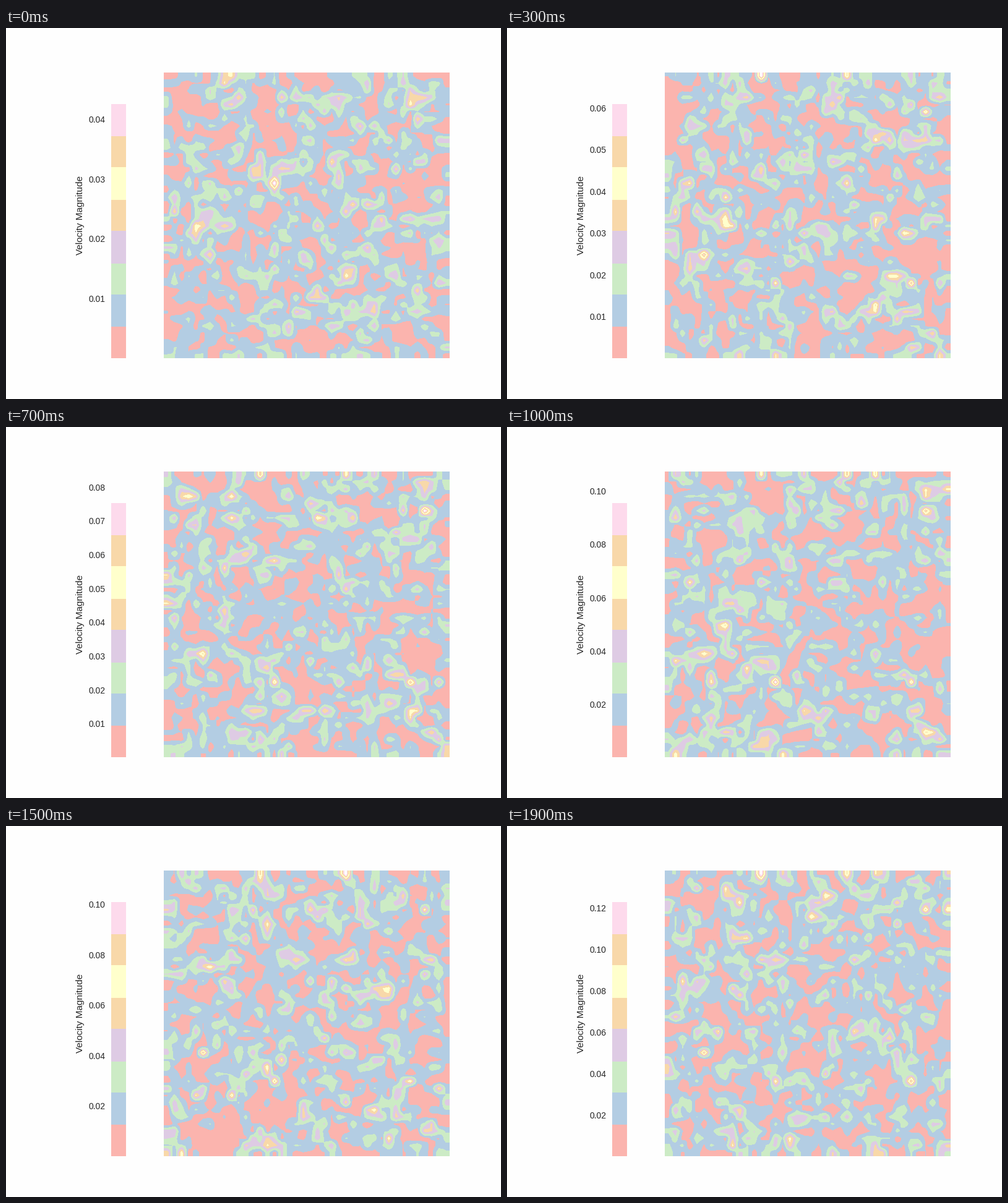
Recreate the animation shown at these times as a matplotlib script. Size 800 px wide and 600 px high, loop 2 s.

```python
import numpy as np
import matplotlib.pyplot as plt
from matplotlib.animation import FuncAnimation
from matplotlib.colors import ListedColormap

W, H, DPI = 800, 600, 100
N, FRAMES, STEP = 40, 20, 100
INK, PAPER, SAND = "#262626", "#fefefe", "#f8d8a9"
BANDS = ["#fbb4ae", "#b3cde3", "#ccebc5", "#decbe4", SAND,
         "#ffffcc", SAND, "#fddaec", PAPER]

# Top of the scale at a few moments
KEYS = [0, 3, 7, 10, 12, 15, 19]
PEAK = [.0478, .0685, .0846, .1074, .1021, .1134, .1379]

# Column and row of the eddies that outlast the rest
EDDIES = [(13, 0), (25, 0), (36, 5), (5, 25), (15, 29), (34, 29)]

plt.rcParams.update({"font.family": "Liberation Sans", "font.size": 10,
                     "axes.labelcolor": INK, "ytick.color": INK})


def blur(z):
    """Mix each cell with its four neighbours, keeping the variance."""
    near = sum(np.roll(z, s, axis) for s in (-1, 1) for axis in (0, 1))
    return (z + .5 * near) / np.sqrt(2)


def drift(seed, keep=.82):
    """Yield complex noise that forgets its past little by little."""
    rng = np.random.default_rng(seed)
    noise = lambda: rng.normal(size=(2, N, N)).T @ [1, 1j]
    z = noise()
    for _ in range(FRAMES):
        yield z
        z = keep * z + np.sqrt(1 - keep ** 2) * noise()


def simulate():
    fields = []
    for n, (flow, mood) in enumerate(zip(drift(12), drift(5))):
        speed = np.abs(flow) * np.exp(.5 * blur(mood.real))
        speed *= .18 / speed.mean()
        speed = .75 * np.tanh(speed / .75)
        for k, (col, row) in enumerate(EDDIES):
            level = min(n / 3, 1) * (.74 + .1 * np.sin(2.4 * k + .4 * n))
            speed[row, col] = max(speed[row, col], level)
        speed.flat[speed.argmax()] = 1
        speed.flat[speed.argmin()] = .001
        fields.append(speed * np.interp(n, KEYS, PEAK))
    return fields


def add_axes(x, width):
    ax = fig.add_axes([x / W, 66 / H, width / W, 462 / H])
    ax.spines[:].set_visible(False)
    ax.set_facecolor(PAPER)
    return ax


fields = simulate()
cmap = ListedColormap(BANDS)
fig = plt.figure(figsize=(W / DPI, H / DPI), dpi=DPI, facecolor=PAPER)

ax = add_axes(255, 462)
image = ax.imshow(fields[0], cmap=cmap, interpolation="bilinear",
                  interpolation_stage="data", aspect="auto")
ax.set_xticks([])
ax.set_yticks([])

cax = add_axes(169.9, 23.1)
bar = cax.imshow(np.arange(256)[:, None], cmap=cmap, origin="lower",
                 vmin=-.5, vmax=255.5, interpolation="nearest", aspect="auto")
cax.set_xticks([])
cax.tick_params(axis="y", length=0, pad=7)
cax.yaxis.set_major_formatter("{x:.2f}")
cax.set_ylabel("Velocity Magnitude", fontsize=11)


def update(n):
    low, high = fields[n].min(), fields[n].max()
    image.set_data(fields[n])
    image.set_clim(low, high)
    bar.set_extent((0, 1, low, high))
    cax.set_xlim(0, 1)
    cax.set_ylim(low, high)
    return image, bar


anim = FuncAnimation(fig, update, frames=FRAMES, interval=STEP,
                     init_func=lambda: update(0), repeat=True,
                     repeat_delay=0, blit=False)
plt.show()
```
